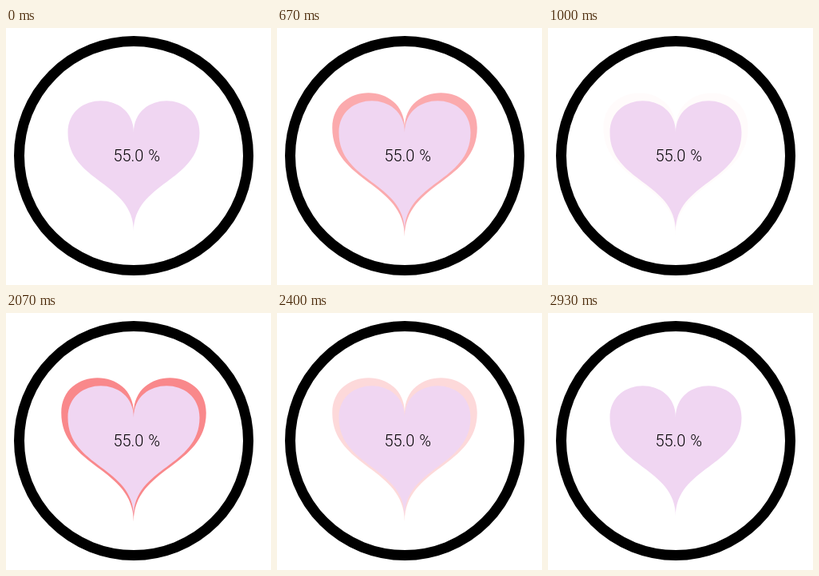
An HTML page that plays this animation: 332x322 px, repeating every 3.07 s.

```html
<!DOCTYPE html>
<html lang="en">
<head>
<meta charset="utf-8">
<title>Heartbeat gauge</title>
<style>
  html, body { margin: 0; width: 100%; height: 100%; overflow: hidden; background: #fff; }
  svg { display: block; }
  text { font: 300 20px Roboto, "Liberation Sans", sans-serif; fill: #000; }
</style>
</head>
<body>
<svg width="332" height="322" viewBox="0 0 332 322">
  <circle cx="160" cy="160" r="143.5" fill="none" stroke="#000" stroke-width="13"/>
  <path id="pulse" fill="rgb(243,14,20)" opacity="0"/>
  <path id="heart" fill="#f0d6f2"/>
  <text x="134.4" y="167">55.0<tspan x="178.3">%</tspan></text>
</svg>
<script>
const LOOP = 3070;
const BEATS = [
  [530, 600, 670, 730, 800, 870, 930, 1000],
  [2070, 2130, 2200, 2270, 2330, 2400, 2470, 2530]
];
const CLEAR = 2530;
const CX = 160;
const pulse = document.getElementById('pulse');

// Heart with vertical tangents at the notch, the sides and the tip.
function heartPath(top, width, height) {
  const left = CX - width / 2, right = CX + width / 2;
  const notch = top + height * 0.3;
  const mid = top + height * 0.65;
  const tip = top + height;
  return `M${CX} ${notch}` +
    `C${CX} ${top} ${left} ${top} ${left} ${notch}` +
    `C${left} ${mid} ${CX} ${mid} ${CX} ${tip}` +
    `C${CX} ${mid} ${right} ${mid} ${right} ${notch}` +
    `C${right} ${top} ${CX} ${top} ${CX} ${notch}Z`;
}

// Each beat flashes, then fades in discrete steps; the first leaves a faint trace.
function pulseOpacity(t) {
  if (t < BEATS[0][0] || t >= CLEAR) return 0;
  const beat = t < BEATS[1][0] ? BEATS[0] : BEATS[1];
  const step = beat.filter(s => s <= t).pop();
  return 0.49 - (step - beat[0]) * 0.00101;
}

function draw(t) {
  pulse.setAttribute('opacity', pulseOpacity(t).toFixed(4));
}

document.getElementById('heart').setAttribute('d', heartPath(78, 165, 177));
pulse.setAttribute('d', heartPath(66.7, 181.5, 194.7));

const start = performance.now();
function tick() {
  draw((performance.now() - start) % LOOP);
  requestAnimationFrame(tick);
}
draw(0);
requestAnimationFrame(tick);
</script>
</body>
</html>
```
